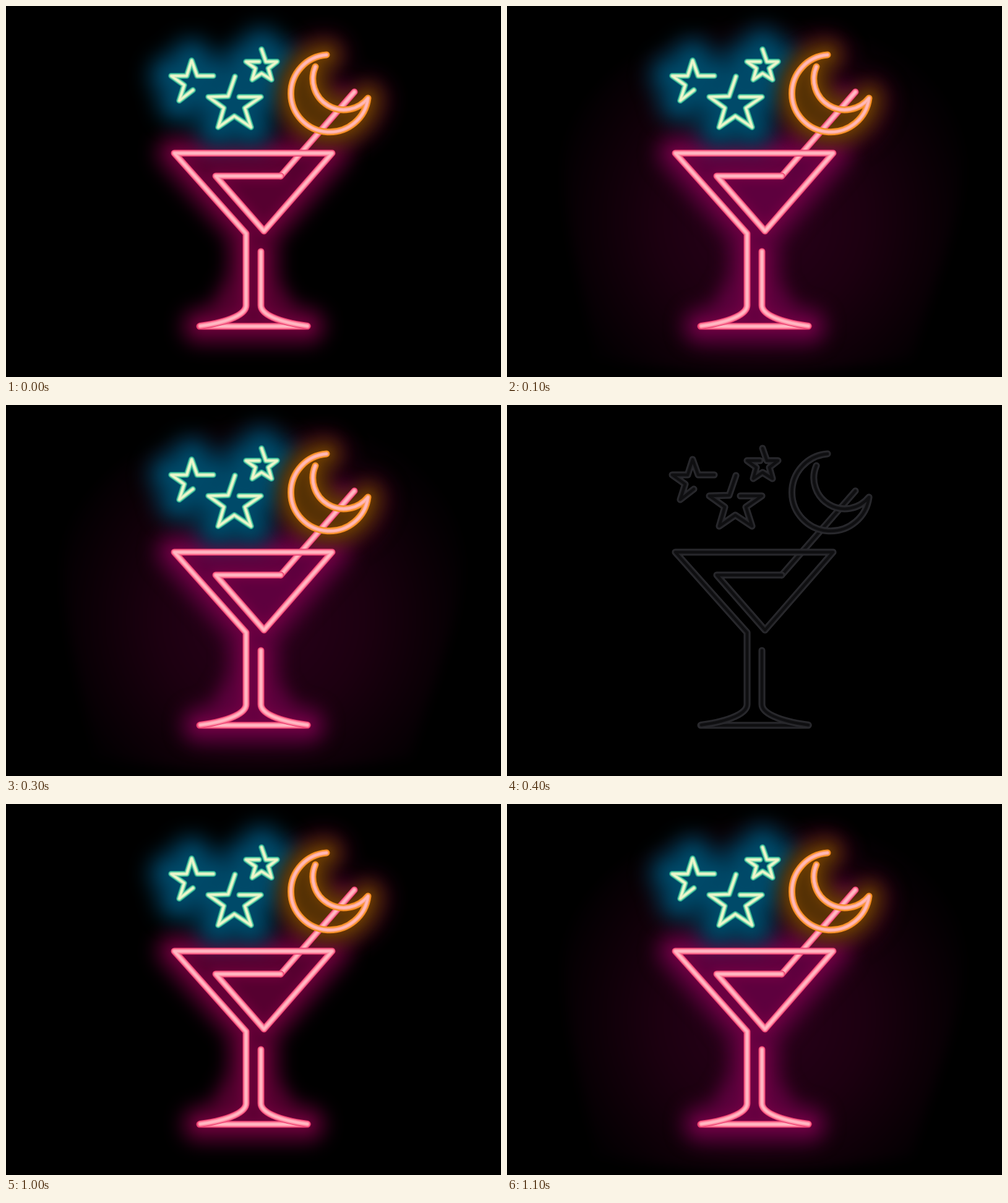
These frames come from a looping animation (800 by 600 pixels, 3.6 s). An HTML page:

```html
<!DOCTYPE html>
<html lang="en">
<head>
<meta charset="utf-8">
<title>Neon cocktail</title>
<style>
html, body { margin: 0; width: 100%; height: 100%; overflow: hidden; background: #000; }
svg { display: block; width: 100vw; height: 100vh; }
path { fill: none; stroke-linecap: round; stroke-linejoin: round; }

.lit, .room, .pink-halo { animation: 3600ms step-end infinite; }
.lit { animation-name: power; }
.room { animation-name: room; }
.pink-halo { animation-name: tint; }

/* The sign goes dark once; around that it flickers between dim and full. */
@keyframes power {
  0% { opacity: 1; }
  11.111% { opacity: 0; }
  25%, 100% { opacity: 1; }
}
@keyframes room {
  0%, 5.555% { opacity: 0; }
  2.777%, 8.333% { opacity: 1; }
  11.111% { opacity: 0; }
  25% { opacity: 1; }
  27.777% { opacity: 0; }
  30.555%, 100% { opacity: 1; }
}
@keyframes tint {
  0%, 5.555%, 27.777% { color: #560030; }
  2.777%, 8.333%, 30.555%, 100% { color: #5e003e; }
  25% { color: #5e003e; }
}
</style>
</head>
<body>
<svg viewBox="0 0 800 600">
  <defs>
    <radialGradient id="plum" gradientUnits="userSpaceOnUse" cx="412" cy="345" r="335">
      <stop offset="0" stop-color="#2a001b"/>
      <stop offset=".5" stop-color="#1c0010"/>
      <stop offset=".8" stop-color="#0d0007"/>
      <stop offset="1" stop-color="#030002"/>
    </radialGradient>
  </defs>
  <g id="off"></g>
  <g class="room">
    <path id="wall" style="fill:url(#plum)" d="M145 570C125 470 90 350 92 250C105 120 260 22 415 20C580 22 728 110 737 250C738 350 680 470 655 570Q400 615 145 570Z"/>
  </g>
  <g class="lit">
    <g id="halo"></g>
    <g id="tubes"></g>
  </g>
</svg>
<script>
const NS = 'http://www.w3.org/2000/svg';
const $ = id => document.getElementById(id);

function add(parent, tag, attrs) {
  const el = document.createElementNS(NS, tag);
  for (const key in attrs) el.setAttribute(key, attrs[key]);
  return parent.appendChild(el);
}

function blur(size) {
  const id = 'blur' + String(size).replace('.', '_');
  if (!$(id)) {
    const filter = add(document.querySelector('defs'), 'filter', {
      id, filterUnits: 'userSpaceOnUse', x: -60, y: -60, width: 920, height: 720,
      'color-interpolation-filters': 'sRGB'
    });
    add(filter, 'feGaussianBlur', { stdDeviation: size });
  }
  return `url(#${id})`;
}

const straw = 'M444 275L563 139';
const bowl = 'M444 275H339L417 364L527 238H272L388 368V484C388 498 362 511 314 517.5';
const foot = 'M412 397V484C412 498 438 511 487 517.5';
const base = 'M313 518H487';
const moon = 'M518 79A62.5 62.5 0 1 0 585 149A50 50 0 0 1 500 98';
const stars = [
  'M335 113H309L300 88L292 113H267L288 128L280 153L302 136',
  'M370 114L359 146L327 147L352 165L343 196L369 178L396 196L386 165L412 147H377',
  'M413 70L420 90H438L424 101L429 119L413 109L398 119L403 101L388 90H409'
];

// Each tube is a stack of [colour, width] strokes, from edge to core.
const pink = [['#e8386c', 11], ['#f8688c', 9], ['#ff97aa', 6.5], ['#ffb9c4', 3.5]];
const orange = [['#ee8416', 11], ['#fa9838', 9], ['#ffa590', 6], ['#ffbab8', 3.5]];
const mint = [['#16907f', 10], ['#4fc4a2', 8], ['#aee6b8', 5.5], ['#eef7cd', 3.2]];
const glass = [['#2b2b2f', 11], ['#242428', 8], ['#0f0f11', 4.5]];

function tube(parent, d, layers) {
  const g = add(parent, 'g', { filter: blur(0.7) });
  for (const [stroke, width] of layers) add(g, 'path', { d, stroke, 'stroke-width': width });
}

const tubes = [
  ...[straw, base, foot, bowl].map(d => [d, pink]),
  [moon, orange],
  ...stars.map(d => [d, mint])
];
for (const [d, layers] of tubes) {
  tube($('off'), d, glass);
  tube($('tubes'), d, layers);
}

function glow(parts, color, width, size, opacity = 1, fill = 'none', cls = '') {
  const g = add($('halo'), 'g', { filter: blur(size), opacity, class: cls });
  for (const d of parts) add(g, 'path', { d, stroke: color, 'stroke-width': width, style: `fill:${fill}` });
}

const bowlArea = 'M272 238H527L412 368H388Z';

$('wall').setAttribute('filter', blur(9));
glow([moon], '#38001c', 76, 16, 0.75);
glow([bowlArea, bowl, foot, base, 'M470 238L545 160'], 'currentColor', 58, 15, 1, 'currentColor', 'pink-halo');
glow([bowl, foot, base], '#92004c', 20, 8, 0.35);
glow(stars, '#003a56', 74, 16, 1, '#003a56');
glow(stars, '#00587a', 30, 11, 0.55, '#00587a');
glow([moon], '#583404', 46, 13, 0.95);
glow([moon], '#945000', 16, 7, 0.4);
</script>
</body>
</html>
```
